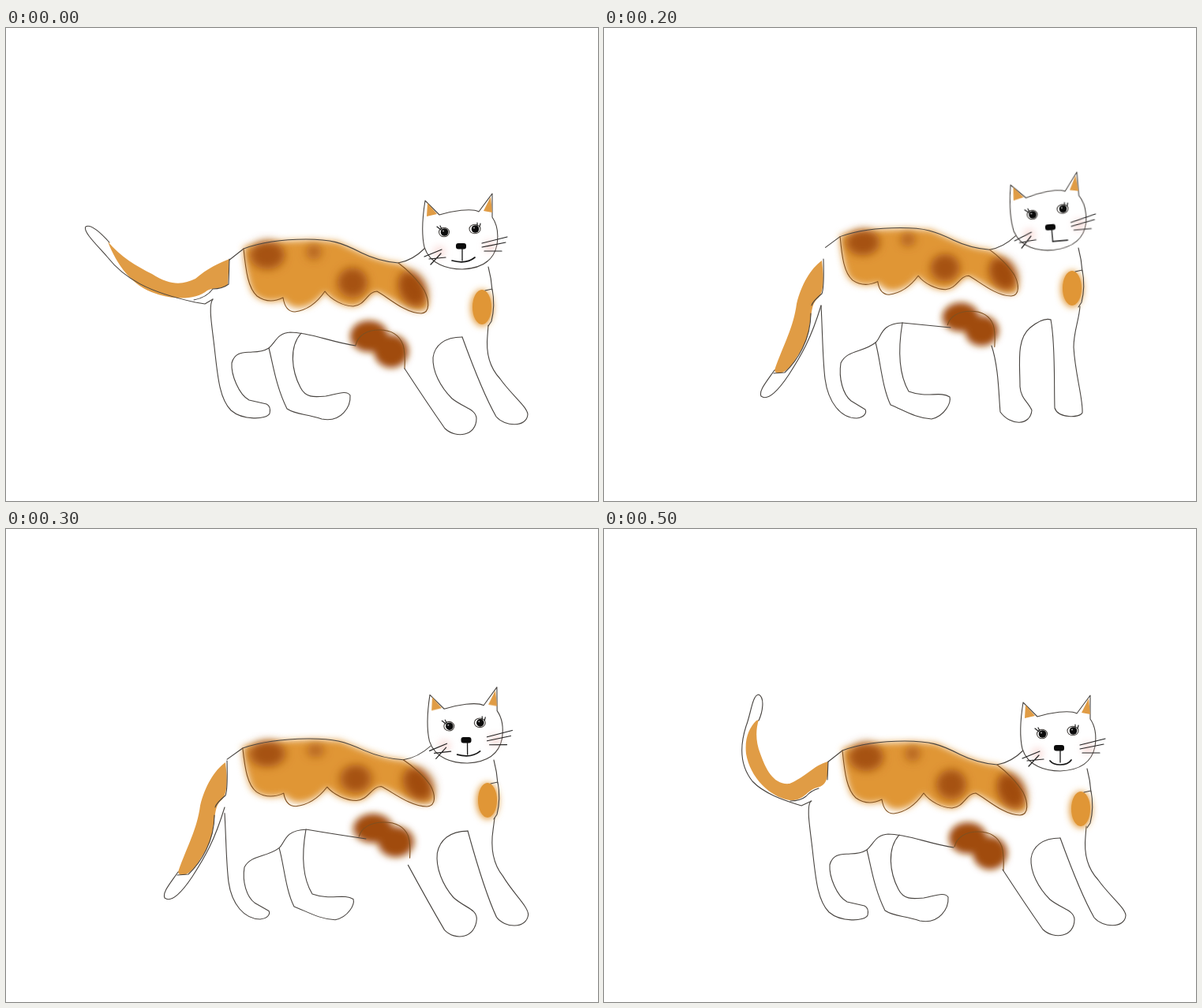
Write an HTML page that moves like this. It is 750 px wide and 600 px high and loops after 0.6 s.

```html
<!DOCTYPE html>
<html lang="en">
<head>
<meta charset="utf-8">
<title>Walking cat</title>
<style>
  html, body { margin: 0; width: 100%; height: 100%; overflow: hidden; background: #fff; }
  svg { display: block; width: 100vw; height: 100vh; overflow: hidden; }
  path, .eye { fill: none; stroke: #484440; stroke-width: 1.1; stroke-linecap: round; stroke-linejoin: round; }
  .orange { fill: #e09636; stroke: none; }
  .tail { fill: #e09c45; stroke: none; filter: url(#edge); }
  .brown { fill: #a04c10; }
  .fold { stroke: #80501f; }
  .ink { stroke: #151515; stroke-width: 1.7; }
  .lash { stroke: #222; stroke-width: 1.2; }
  .strip { animation: walk .6s steps(6) infinite; }
  @keyframes walk { to { transform: translateX(-4500px); } }
</style>
</head>
<body>
<svg viewBox="0 0 750 600">
  <defs>
    <filter id="edge"><feGaussianBlur stdDeviation=".7"/></filter>
    <filter id="soft" x="-30%" y="-30%" width="160%" height="160%"><feGaussianBlur stdDeviation="4.5"/></filter>
    <filter id="haze" x="-60%" y="-60%" width="220%" height="220%"><feGaussianBlur stdDeviation="6"/></filter>

    <!-- back, coat patches and belly patch -->
    <g id="torso">
      <path class="orange" filter="url(#soft)" d="M301 278C330 270 380 267 420 271C450 285 475 297 497 298C515 306 538 335 534 355C522 367 490 344 470 335C458 338 455 352 440 353C425 353 412 345 404 335C392 352 365 365 352 344C335 350 318 346 311 333Q303 310 301 278Z"/>
      <g class="brown" filter="url(#haze)">
        <ellipse cx="331" cy="288" rx="22" ry="18" opacity=".9"/>
        <circle cx="390" cy="284" r="10" opacity=".65"/>
        <circle cx="439" cy="323" r="19" opacity=".9"/>
        <ellipse cx="515" cy="331" rx="17" ry="24" transform="rotate(-25 515 331)"/>
      </g>
      <g class="brown" filter="url(#soft)">
        <ellipse cx="460" cy="391" rx="24" ry="20"/>
        <ellipse cx="488" cy="410" rx="22" ry="21"/>
      </g>
      <path d="M282 295L301 280C325 271 355 268 380 268C412 268 425 272 450 285C470 295 485 297 497 298C510 296 520 290 531 279"/>
      <path class="fold" d="M301 280C304 310 307 330 318 340Q333 351 351 342C353 355 358 360 366 360C382 358 395 347 404 334C412 345 428 353 440 353C455 352 458 334 470 334C482 340 505 362 526 362C538 361 536 345 530 333C522 320 508 306 497 298"/>
      <path class="fold" d="M443 402C446 390 457 383 473 383C491 383 499 391 503 402Q506 412 505 432"/>
    </g>

    <g id="chest">
      <ellipse class="orange" cx="603" cy="355" rx="14" ry="23" filter="url(#soft)"/>
      <ellipse class="orange" cx="603" cy="354" rx="12" ry="22" filter="url(#edge)"/>
      <path d="M611 303Q615 318 616 333M607 333L616 331Q620 352 615 372L611 378"/>
    </g>

    <!-- head without its mouth -->
    <g id="head">
      <path style="fill:#fff" d="M531 219C526 250 527 265 530 278C537 300 560 306 578 306C602 305 618 295 622 275C624 262 623 250 616 240V210L599 233C590 228 565 232 549 237Z"/>
      <path class="tail" d="M534 222L546 236L533 239ZM614 214L616 234L605 232Z"/>
      <g fill="#f6c9c4" filter="url(#soft)" opacity=".55">
        <circle cx="549" cy="284" r="8"/><circle cx="613" cy="277" r="8"/>
      </g>
      <ellipse class="eye" cx="555" cy="259" rx="6.5" ry="5.8"/>
      <ellipse class="eye" cx="594" cy="255" rx="7" ry="5.8"/>
      <circle cx="555.5" cy="259" r="4.8" fill="#0b0b0b"/>
      <circle cx="594.5" cy="255" r="4.8" fill="#0b0b0b"/>
      <circle cx="554" cy="257.5" r="1" fill="#aaa"/>
      <circle cx="593" cy="253.5" r="1" fill="#aaa"/>
      <path class="lash" d="M546 252L551 256M550 251L552 255M597 247L597 251M601 248L600 252"/>
      <rect x="570" y="273" width="13" height="7.5" rx="3" fill="#0b0b0b"/>
      <path class="lash" d="M603 273L635 265M603 278L633 272M606 283L628 283M530 290L552 281M536 293L557 291M538 300L551 286"/>
      <path class="ink" style="stroke-width:1.3" d="M578 280V295"/>
    </g>
    <path id="flat" class="ink" d="M565 295Q583 300 594 291"/>
    <path id="smile" class="ink" d="M565 293Q569 298 578 298Q588 298 592 292"/>
    <path id="half" class="ink" style="stroke-width:1.3" d="M578 295L597 295"/>

    <!-- stretched stride: hind legs, belly, front legs -->
    <g id="hind">
      <path d="M262 344C256 352 261 378 264 405C268 440 270 470 285 485C300 498 330 497 334 489Q336 480 330 477L308 472C295 465 285 440 286 425C290 410 302 412 312 411Q325 411 333 406C342 398 344 387 360 386C385 386 410 398 443 403"/>
      <path d="M333 406C338 425 342 455 356 483C368 491 380 489 400 496C425 501 437 480 436 466C432 459 420 464 405 467C392 468 380 470 373 456C362 435 358 405 374 387"/>
    </g>
    <g id="front">
      <path d="M505 432C520 455 540 485 556 508C570 521 596 518 596 495C595 483 580 482 565 470C550 455 540 435 541 418C543 403 555 392 578 392"/>
      <path d="M578 392C590 425 605 465 621 493C632 506 660 507 661 490C660 480 640 465 626 445C612 430 608 410 610 390L611 377"/>
    </g>

    <!-- lowered tail and planted hind legs -->
    <g id="low-tail">
      <path class="tail" d="M276 295C262 305 250 325 244 350C240 380 228 400 216 434C218 442 230 438 240 425C248 410 258 400 260 380C264 360 262 350 272 342C281 330 277 305 276 295Z"/>
      <path d="M278 293Q279 330 276 337Q264 347 263 352M262 362C262 395 245 422 229 437L215 438M216 434C205 450 196 460 199 467C208 474 222 458 234 440C250 415 262 395 275 352"/>
    </g>
    <g id="planted">
      <path d="M275 352C277 390 277 420 280 445C284 475 300 495 320 495C330 494 333 488 331 484L313 473C303 465 297 445 300 425C308 408 328 412 344 399C352 392 350 375 378 374"/>
      <path d="M344 399C350 420 352 455 363 478C380 485 395 495 415 496C432 492 440 475 438 468C425 460 410 470 386 461C374 440 372 410 378 374"/>
    </g>

    <g id="leap">
      <use href="#torso"/><use href="#hind"/><use href="#front"/><use href="#chest"/>
      <path class="tail" d="M129 271C145 290 165 302 185 312C210 328 225 325 240 318C255 305 270 298 283 293L281 325C275 332 262 329 255 333C240 346 210 344 190 337C160 328 140 300 129 271Z"/>
      <path d="M131 272C122 262 108 248 101 252C97 258 115 275 128 290C150 318 180 335 240 348L252 350L262 344M283 293L282 325Q274 331 262 331Q254 342 238 345"/>
      <use href="#head"/><use href="#flat"/>
    </g>
  </defs>

  <g class="strip">
    <use href="#leap"/>

    <g transform="translate(750)">
      <use href="#torso" transform="matrix(.967 0 -.01 .92 11.8 8.5)"/>
      <path class="tail" d="M277 284C265 292 250 305 243 325C234 350 234 370 226 395C220 415 217 430 218 437C228 440 235 434 240 420C243 405 242 395 250 378C256 360 252 345 262 332C274 325 274 315 277 284Z"/>
      <path d="M277 284Q278 312 270 325Q256 333 255 345M219 437Q229 438 235 430M218 432C212 445 206 462 210 470C218 472 226 460 230 448C240 430 243 410 250 392Q260 355 268 340"/>
      <path d="M268 340C266 370 263 388 256 400C250 412 244 420 240 430C234 455 238 480 250 492C256 499 268 498 267 492C264 480 260 475 260 466C265 440 272 415 290 406C305 402 320 400 328 392C335 388 338 377 345 375C380 374 410 380 439 384"/>
      <path d="M328 392C318 420 308 440 304 460C310 475 330 490 345 494C360 495 375 487 376 476C372 462 350 468 332 457C336 435 350 410 369 377"/>
      <path d="M494 405C503 425 507 460 515 485C530 497 552 494 553 479C553 467 540 463 535 450C527 430 528 400 540 385C550 377 560 373 572 373"/>
      <path d="M572 373C590 410 605 450 622 482C635 495 660 489 662 476C658 465 640 455 628 435C612 410 604 390 605 370L606 352"/>
      <use href="#chest" transform="translate(-7 -24)"/>
      <g transform="translate(-12 -22) rotate(-8 576 277)"><use href="#head"/><use href="#smile"/></g>
    </g>

    <g transform="translate(1500)">
      <use href="#torso" transform="matrix(.967 0 -.01 .92 10.8 7)"/>
      <use href="#low-tail"/><use href="#planted"/>
      <path d="M378 374Q408 377 439 380"/>
      <path d="M491 403C500 430 500 465 502 487C515 505 540 505 542 485C538 475 528 470 527 455C527 425 522 395 540 380C550 372 560 368 566 370"/>
      <path d="M566 370C572 400 570 450 571 482C575 495 603 495 606 488C607 470 597 440 595 405C595 385 602 370 603 353"/>
      <use href="#chest" transform="translate(-10 -24)"/>
      <g transform="translate(-11 -24) rotate(-5 576 277)"><use href="#head"/><use href="#half"/></g>
    </g>

    <g transform="translate(2250)">
      <use href="#torso" transform="matrix(1.038 -.01 0 .93 -12.6 20.6)"/>
      <use href="#low-tail" transform="translate(2 1)"/>
      <use href="#planted" transform="matrix(1 0 0 .94 2 29.6)"/>
      <path d="M380 381Q415 387 456 393"/>
      <use href="#front" transform="matrix(1 0 -.065 1.083 32.5 -41.5)"/>
      <use href="#chest" transform="translate(7 -10)"/>
      <g transform="translate(6.5 -9) rotate(-.5 576 277)"><use href="#head"/><use href="#flat"/></g>
    </g>

    <use href="#leap" x="3000"/>

    <g transform="translate(3750)">
      <use href="#torso" transform="translate(1 1)"/>
      <use href="#hind" transform="translate(0 1)"/>
      <use href="#front"/>
      <use href="#chest" transform="translate(1 1)"/>
      <path class="tail" d="M193 243C184 252 178 265 180 285C185 315 210 340 235 344C255 345 255 332 270 328C284 325 284 312 284 295C265 300 255 315 235 323C215 325 205 305 198 285C192 270 192 255 196 242Z"/>
      <path d="M196 243C201 232 204 214 196 210C188 210 186 235 180 250C172 275 172 300 188 320C205 338 235 346 250 351L263 345M284 295L283 318M272 329Q262 332 256 339Q249 345 236 345"/>
      <g transform="translate(0 1)"><use href="#head"/><use href="#smile"/></g>
    </g>
  </g>
</svg>
</body>
</html>
```
